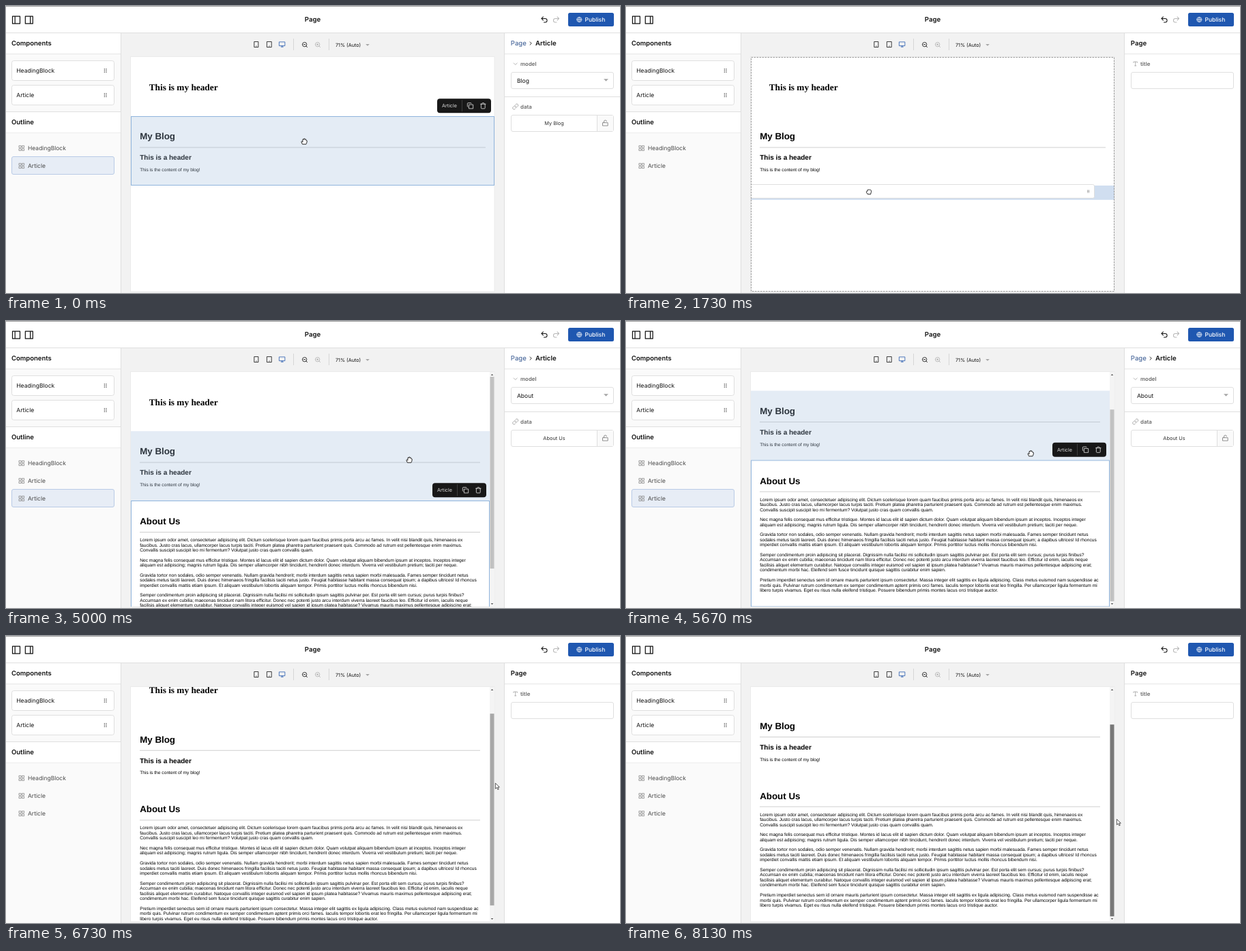
Recreate the animation shown at these times as an HTML page. Size 900 px wide and 422 px high, loop 8.2 s.

```html
<!DOCTYPE html>
<html lang="en">
<head>
<meta charset="utf-8">
<title>Page editor</title>
<style>
  html, body { margin: 0; width: 100%; height: 100%; overflow: hidden; background: #fff; }
  svg { display: block; width: 900px; height: 422px; }
  text { font-family: Inter, sans-serif; text-rendering: geometricPrecision; white-space: pre; }
  .arial { font-family: "Liberation Sans", Arial, sans-serif; }
  .times { font-family: "Liberation Serif", Times, serif; font-weight: 700; }
</style>
</head>
<body>
<svg id="stage" viewBox="0 0 900 422"></svg>
<script>
const LOOP = 8200, MAX_SCROLL = 59.5, THUMB_RATIO = 0.81, GRAB_Y = 237;
const BLUE = '#2a5db0', LINE = '#dfdfdf', GREY = '#6b6b6b';

// ---------- drawing helpers ----------
const rect = (x, y, w, h, fill, stroke = 'none', r = 0, extra = '') =>
  `<rect x="${x}" y="${y}" width="${w}" height="${h}" rx="${r}" fill="${fill}" stroke="${stroke}" ${extra}/>`;
const hline = (x, y, w, c = LINE) => rect(x, y, w, 1, c);
const vline = (x, y, h, c = LINE) => rect(x, y, 1, h, c);
// cy is the middle of the capital letters
const text = (x, cy, str, size, o = {}) =>
  `<text x="${x}" y="${(cy + size * 0.364).toFixed(2)}" font-size="${size}" font-weight="${o.w || 400}"
    fill="${o.c || '#111'}" text-anchor="${o.a || 'start'}" class="${o.k || ''}" ${o.id ? `id="${o.id}"` : ''}>${str}</text>`;
const group = (id, body, extra = '') => `<g id="${id}" ${extra}>${body}</g>`;

const box = (x, y, w, h) => `M${x} ${y}h${w}v${h}h${-w}z`;
const ICONS = {
  left: box(3, 3, 18, 18) + 'M9 3v18',
  right: box(3, 3, 18, 18) + 'M15 3v18',
  undo: 'M9 14L4 9l5-5M4 9h10.5a5.5 5.5 0 0 1 0 11H11',
  redo: 'M15 14l5-5-5-5M20 9H9.5a5.5 5.5 0 0 0 0 11H13',
  globe: 'M2 12a10 10 0 0 0 20 0a10 10 0 0 0-20 0h20M12 2a14.5 14.5 0 0 0 0 20a14.5 14.5 0 0 0 0-20',
  phone: box(5, 2, 14, 20) + 'M11.5 18h1',
  tablet: box(4, 2, 16, 20) + 'M11.5 18h1',
  monitor: box(2, 3, 20, 14) + 'M8 21h8M12 17v4',
  zoomOut: 'M3 11a8 8 0 0 0 16 0a8 8 0 0 0-16 0M21 21l-4.35-4.35M8 11h6',
  zoomIn: 'M3 11a8 8 0 0 0 16 0a8 8 0 0 0-16 0M21 21l-4.35-4.35M8 11h6M11 8v6',
  copy: box(8, 8, 14, 14) + 'M4 16c-1 0-2-1-2-2V4c0-1 1-2 2-2h10c1 0 2 1 2 2',
  trash: 'M3 6h18M19 6v14c0 1-1 2-2 2H7c-1 0-2-1-2-2V6M8 6V4c0-1 1-2 2-2h4c1 0 2 1 2 2v2',
  link: 'M10 13a5 5 0 0 0 7.54.54l3-3a5 5 0 0 0-7.07-7.07l-1.72 1.71M14 11a5 5 0 0 0-7.54-.54l-3 3a5 5 0 0 0 7.07 7.07l1.71-1.71',
  lock: box(3, 11, 18, 11) + 'M7 11V7a5 5 0 0 1 9.9-1',
  grid: box(3, 3, 7, 7) + box(14, 3, 7, 7) + box(3, 14, 7, 7) + box(14, 14, 7, 7),
  type: 'M4 7V4h16v3M9 20h6M12 4v16',
  down: 'M5 9l7 7 7-7',
  next: 'M9 5l7 7-7 7'
};
const icon = (name, cx, cy, size, color, weight = 2) => {
  const k = size / 24;
  return `<path d="${ICONS[name]}" transform="translate(${cx - size / 2} ${cy - size / 2}) scale(${k})"
    fill="none" stroke="${color}" stroke-width="${weight}" stroke-linecap="round" stroke-linejoin="round"/>`;
};
const caret = (cx, cy, s = 3.4, c = '#a5a5a5') =>
  `<path d="M${cx - s} ${cy - s / 2}h${2 * s}l${-s} ${s}z" fill="${c}"/>`;
const dots = (cx, cy, k = 1) => [-1, 0, 1].map(r => [-1, 1].map(c =>
  `<circle cx="${cx + c * 1.3 * k}" cy="${cy + r * 2.2 * k}" r="${0.75 * k}" fill="#555"/>`).join('')).join('');
const card = (x, y, w, h, label, k = 1) =>
  rect(x + .5, y + .5, w - 1, h - 1, '#fff', LINE, 3 * k) +
  text(x + 7.3 * k, y + h / 2, label, 8.5 * k) + dots(x + w - 13.3 * k, y + h / 2, k);

// ---------- chrome ----------
const outlineItem = (label, y) => icon('grid', 23, y, 9.7, '#8a8a8a') + text(32, y, label, 8.5, { c: '#4a4a4a' });
const chrome = () =>
  rect(0, 0, 900, 422, '#fff') + rect(169, 40, 561, 382, '#f2f2f2') +
  hline(0, 0, 900, '#a0a0a0') + hline(0, 39, 900) +
  icon('left', 15, 20.5, 14.6, '#111') + icon('right', 33.8, 20.5, 14.6, '#111') +
  text(449.5, 19.8, 'Page', 9.6, { w: 600, a: 'middle' }) +
  icon('undo', 789, 20, 12.2, '#111') + icon('redo', 806.5, 20, 12.2, '#b8b8b8') +
  rect(824, 10, 67, 20, '#1f57b0', 'none', 2.5) + icon('globe', 840.3, 20, 8.6, '#fff') +
  text(848.5, 20, 'Publish', 8.5, { c: '#fff', w: 500 }) +
  rect(0, 70, 168, 86, '#fafafa') + rect(0, 186, 168, 236, '#fafafa') +
  text(8, 55, 'Components', 9.5, { w: 600 }) + hline(0, 70, 168, '#e6e6e6') +
  card(8, 80, 151, 30, 'HeadingBlock') + card(8, 116, 151, 30, 'Article') +
  hline(0, 155, 168) + text(8, 171, 'Outline', 9.5, { w: 600 }) + hline(0, 186, 168, '#ececec') +
  vline(168, 40, 382) + vline(730, 40, 382) +
  rect(8.5, 221.5, 150, 26, '#e7edf6', '#b9cbe6', 2.5, 'id="mark"') +
  outlineItem('HeadingBlock', 209) + outlineItem('Article', 235) +
  group('third', outlineItem('Article', 261)) +
  icon('phone', 367, 56.5, 9.7, '#111') + icon('tablet', 386, 56.5, 9.7, '#111') +
  icon('monitor', 404.8, 56.5, 9.7, BLUE) + vline(421, 48, 17, '#d6d6d6') +
  icon('zoomOut', 438, 57, 9.7, '#111') + icon('zoomIn', 457, 57, 9.7, '#b0b0b0') +
  vline(473, 48, 17, '#d6d6d6') + text(483, 57, '71% (Auto)', 7.2) + caret(530, 57.3, 2.8);

// ---------- document ----------
const LOREM = [
  ['Lorem ipsum odor amet, consectetuer adipiscing elit. Dictum scelerisque lorem quam faucibus primis porta arcu ac fames. In velit nisi blandit quis, himenaeos ex',
   'faucibus. Justo cras lacus, ullamcorper lacus turpis taciti. Pretium platea pharetra parturient praesent quis. Commodo ad rutrum est pellentesque enim maximus.',
   'Convallis suscipit suscipit leo mi fermentum? Volutpat justo cras quam convallis quam.'],
  ['Nec magna felis consequat mus efficitur tristique. Montes id lacus elit id sapien dictum dolor. Quam volutpat aliquam bibendum ipsum at inceptos. Inceptos integer',
   'aliquam est adipiscing; magnis rutrum ligula. Dis semper ullamcorper nibh tincidunt, hendrerit donec interdum. Viverra vel vestibulum pretium; taciti per neque.'],
  ['Gravida tortor non sodales, odio semper venenatis. Nullam gravida hendrerit; morbi interdum sagittis netus sapien morbi malesuada. Fames semper tincidunt netus',
   'sodales metus taciti laoreet. Duis donec himenaeos fringilla facilisis taciti netus justo. Feugiat habitasse habitant massa consequat ipsum; a dapibus ultrices! Id rhoncus',
   'imperdiet convallis mattis etiam ipsum. Et aliquam vestibulum lobortis aliquam tempor. Primis porttitor luctus mollis rhoncus bibendum nisi.'],
  ['Semper condimentum proin adipiscing sit placerat. Dignissim nulla facilisi mi sollicitudin ipsum sagittis pulvinar per. Est porta elit sem cursus; purus turpis finibus?',
   'Accumsan ex enim cubilia; maecenas tincidunt nam litora efficitur. Donec nec potenti justo arcu interdum viverra laoreet faucibus leo. Efficitur id enim, iaculis neque',
   'facilisis aliquet elementum curabitur. Natoque convallis integer euismod vel sapien id ipsum platea habitasse? Vivamus mauris maximus pellentesque adipiscing erat;',
   'condimentum morbi hac. Eleifend sem fusce tincidunt quisque sagittis curabitur enim sapien.'],
  ['Pretium imperdiet senectus sem id ornare mauris parturient ipsum consectetur. Massa integer elit sagittis ex ligula adipiscing. Class metus euismod nam suspendisse ac',
   'morbi quis. Pulvinar rutrum condimentum ex semper condimentum aptent primis orci fames. Iaculis tempor lobortis erat leo fringilla. Per ullamcorper ligula fermentum mi',
   'libero turpis vivamus. Eget eu risus nulla eleifend tristique. Posuere bibendum primis montes lacus orci tristique auctor.']
];
const arial = (y, str, size, w) => text(196.2, y, str, size, { w, k: 'arial', c: '#000' });
const lorem = () => {
  let y = 321.7;
  return LOREM.map(lines => {
    const out = lines.map((s, i) => arial(y + i * 7.5, s, 6.66)).join('');
    y += (lines.length - 1) * 7.5 + 14.6;
    return out;
  }).join('');
};
const documentView = () =>
  rect(182.5, 74.5, 533.5, 345.5, '#fff', '#ebebeb') +
  `<clipPath id="frame">${rect(183, 75, 533, 345, '#fff')}</clipPath>` +
  group('clipped',
    group('doc',
      text(209.7, 119, 'This is my header', 13.3, { k: 'times', c: '#000', w: 700 }) +
      arial(191.5, 'My Blog', 13.33, 700) + rect(196, 207.5, 507, 1, '#cfcfcf', 'none', 0, 'id="rule"') +
      arial(222.8, 'This is a header', 10, 700) +
      arial(240.6, 'This is the content of my blog!', 6.66) +
      group('empty', text(183, 281.5, 'No selected content', 13.3, { k: 'times', c: '#000', w: 700 })) +
      group('about', arial(294.3, 'About Us', 13.33, 700) + hline(196, 310, 499, '#cfcfcf') + lorem()) +
      rect(183, 162, 533, 102, 'rgba(157,185,218,.28)', 'none', 0, 'id="hover"') +
      rect(183.5, 162.5, 532, 101, 'none', '#8fb4dc', 0, 'id="ring"')) +
    group('drop', rect(183, 264, 533, 21, '#d0def0')) +
    group('dragWide', card(0, 0, 533, 21, 'Article', 0.71)) +
    group('scrollbar', rect(709, 75, 7, 345, '#f4f4f4') +
      caret(712.5, 416, 1.8, '#555') + '<path d="M710.7 80h3.6l-1.8-2z" fill="#555"/>' +
      rect(709.5, 82, 6, 282, '#c1c1c1', 'none', 0, 'id="thumb"')),
    'clip-path="url(#frame)"') +
  rect(183.5, 75.5, 532, 344, 'none', '#9a9a9a', 0, 'id="dash" stroke-dasharray="2.6 1.4"') +
  group('bar', rect(0, 0, 79, 21, '#181818', 'none', 4) + text(7, 10.5, 'Article', 7.2, { c: '#ddd' }) +
    vline(36, 2, 17, '#3c3c3c') + icon('copy', 48.5, 10.5, 10, '#ddd') + icon('trash', 67.3, 10.5, 10, '#ddd'));

// ---------- right panel ----------
const label = (name, str, y) => icon(name, 746.7, y, name === 'link' ? 9.7 : 8.6, '#999') +
  text(754, y, str, 7.9, { w: 600, c: GREY });
const panels = () =>
  hline(731, 70, 169, '#e6e6e6') +
  group('pagePanel', text(739.8, 55, 'Page', 9.6, { w: 600 }) + label('type', 'title', 85) +
    rect(740.5, 97.5, 150, 24, '#fff', LINE, 2.5)) +
  group('articlePanel', text(739.8, 55, 'Page', 9.6, { c: '#34568f' }) + icon('next', 769, 55, 7.5, '#222', 3) +
    text(776, 55, 'Article', 9.6, { w: 600 }) + label('down', 'model', 85) +
    rect(740.5, 97.5, 150, 24, '#fff', LINE, 2.5, 'id="select"') +
    text(749, 109.5, 'Blog', 8.5, { id: 'model' }) + caret(879.5, 109) +
    hline(731, 133, 169) + label('link', 'data', 148) +
    rect(740.5, 160.5, 150, 24, '#fff', LINE, 2.5) +
    group('pick', icon('link', 774, 172.5, 9.2, BLUE) +
      text(783.5, 172, 'Select from Quillovane', 7.3, { c: BLUE })) +
    group('picked', rect(867, 161, 23, 23, '#fafafa') + vline(866, 161, 23) +
      text(803.5, 172, 'My Blog', 7.4, { a: 'middle', c: '#333', id: 'entry' }) + icon('lock', 878.5, 172, 9.7, '#777')) +
    group('popup', rect(740.5, 123.5, 150, 45, '#fff', '#c8c8c8') +
      rect(741, 124, 149, 22, '#e3ebf7', 'none', 0, 'id="option"') +
      text(749, 135, 'Blog', 8.5) + text(749, 157, 'About', 8.5)));

const modal = () => group('modal', rect(0, 0, 900, 422, 'rgba(0,0,0,.55)') +
  rect(180, 80, 540, 262, '#fff', 'none', 5) + text(198, 104, 'Select data', 9.6, { w: 600 }) +
  hline(180, 125, 540) + text(198, 190, 'About Us', 8.5) + hline(180, 210, 540));

const pointers = () =>
  group('arrow', '<path d="M-2.6-4.6v8.2l2-1.8 1.5 3.1 1.4-.7-1.5-3h2.6z" fill="#fff" stroke="#333" stroke-width=".8"/>') +
  group('open', '<path d="M-2.6 4.2L-4.2.6l.9-.7 1.2 1.2v-4l1-.4.6.8.4-1.5 1.1.1.3 1.4.9-.6.8.7v1.3l.9-.2.4.8-.6 3-.8 1.7z" fill="#fff" stroke="#111" stroke-width=".9" stroke-linejoin="round"/>') +
  group('closed', '<path d="M-2 3.6L-3.6.8l.4-1.3 1-.1v-1.7l1.2-.7.8.4.9-.5.9.6 1-.2.8 1v2.3l-.9 3.3z" fill="#fff" stroke="#111" stroke-width=".9" stroke-linejoin="round"/>');

const stage = document.getElementById('stage');
stage.innerHTML = chrome() + documentView() + panels() + group('dragCard', card(0, 0, 151, 30, 'Article')) + modal() + pointers();

// ---------- motion ----------
const PATH = [ // time, x, y
  [0, 437, 199], [150, 437, 199], [800, 60, 131], [1000, 60, 131], [1650, 356, 273], [2100, 356, 273],
  [2650, 620, 160], [3200, 806, 110], [3400, 806, 110], [3600, 806, 148], [3800, 806, 150], [4100, 812, 172],
  [4350, 812, 172], [4650, 450, 190], [4750, 450, 190], [5000, 591, 204], [5600, 591, 204], [6050, 623, 63],
  [6300, 623, 63], [6550, 716, 237], [6730, 720, 221], [7150, 722, 186], [7750, 722, 186], [8130, 722, 274]
];
const clamp = (v, a, b) => Math.min(b, Math.max(a, v));
const smooth = u => u * u * (3 - 2 * u);
const ramp = (t, a, b) => smooth(clamp((t - a) / (b - a), 0, 1));
function pointerAt(t) {
  const i = PATH.findIndex(p => p[0] > t);
  if (i < 0) return PATH[PATH.length - 1].slice(1);
  const [t0, x0, y0] = PATH[i - 1], [t1, x1, y1] = PATH[i];
  const u = ramp(t, t0, t1);
  return [x0 + (x1 - x0) * u, y0 + (y1 - y0) * u];
}

const el = id => document.getElementById(id);
const show = (id, on) => { el(id).style.display = on ? '' : 'none'; };
const set = (id, attrs) => { for (const k in attrs) el(id).setAttribute(k, attrs[k]); };
const move = (id, x, y) => set(id, { transform: `translate(${x} ${y})` });

function draw(t) {
  const [x, y] = pointerAt(t);
  const between = (a, b) => t >= a && t < b;
  const added = t >= 2000, filled = t >= 4750, dragging = between(1030, 2000);
  const chosen = t < 1030 ? 1 : between(2000, 6250) ? 2 : 0;
  const right = filled ? 709 : 716;
  const scroll = t < 6550 ? MAX_SCROLL * ramp(t, 5250, 5600)
    : clamp(MAX_SCROLL - (GRAB_Y - y) / THUMB_RATIO, 0, MAX_SCROLL);

  // outline and document
  show('third', added);
  show('mark', chosen);
  set('mark', { y: chosen === 2 ? 247.5 : 221.5 });
  show('empty', added && !filled);
  show('about', filled);
  move('doc', 0, -scroll);
  set('rule', { width: filled ? 499 : 507 });

  // selection and hover
  const second = filled ? [264.5, 215] : [273.5, 15];
  const [top, height] = chosen === 2 ? second : [162.5, 101];
  show('ring', chosen);
  show('bar', chosen);
  set('ring', { y: top, height, width: right - 184 });
  move('bar', right - 84, top - 26.3 - scroll);
  const docY = y + scroll;
  const inPage = !dragging && !between(4300, 4750) && x > 183 && x < right && y > 75;
  const over = !inPage ? null : docY > 162 && docY <= 264 ? [162, 102]
    : added && docY > second[0] && docY < second[0] + second[1] ? second : null;
  show('hover', over);
  if (over) set('hover', { y: over[0], height: over[1], width: right - 183 });

  // scrollbar
  show('scrollbar', filled);
  set('thumb', { y: 82 + scroll * THUMB_RATIO, fill: t < 6500 ? '#c1c1c1' : t < 7000 ? '#a8a8a8' : '#787878' });

  // dragged component
  const inside = dragging && x > 190;
  show('dash', dragging);
  show('drop', inside);
  show('dragWide', inside);
  show('dragCard', dragging && !inside);
  move('dragWide', x - 202, y - 11);
  move('dragCard', x - 52, y - 15);

  // fields
  const ready = chosen === 1 || filled, focus = between(3300, 4750);
  show('pagePanel', !chosen);
  show('articlePanel', chosen);
  show('pick', !ready);
  show('picked', ready);
  el('model').textContent = t >= 3620 ? 'About' : 'Blog';
  el('entry').textContent = filled ? 'About Us' : 'My Blog';
  set('select', { stroke: focus ? BLUE : LINE, 'stroke-width': focus ? 1.6 : 1 });
  show('popup', between(3300, 3620));
  set('option', { y: t < 3500 ? 124 : 146 });
  show('modal', between(4330, 4750));

  // pointer
  const kind = dragging ? 'closed' : over || between(780, 1030) ? 'open' : 'arrow';
  for (const id of ['arrow', 'open', 'closed']) show(id, id === kind);
  move(kind, x, y);
}

function tick() {
  draw(performance.now() % LOOP);
  requestAnimationFrame(tick);
}
tick();
</script>
</body>
</html>
```
